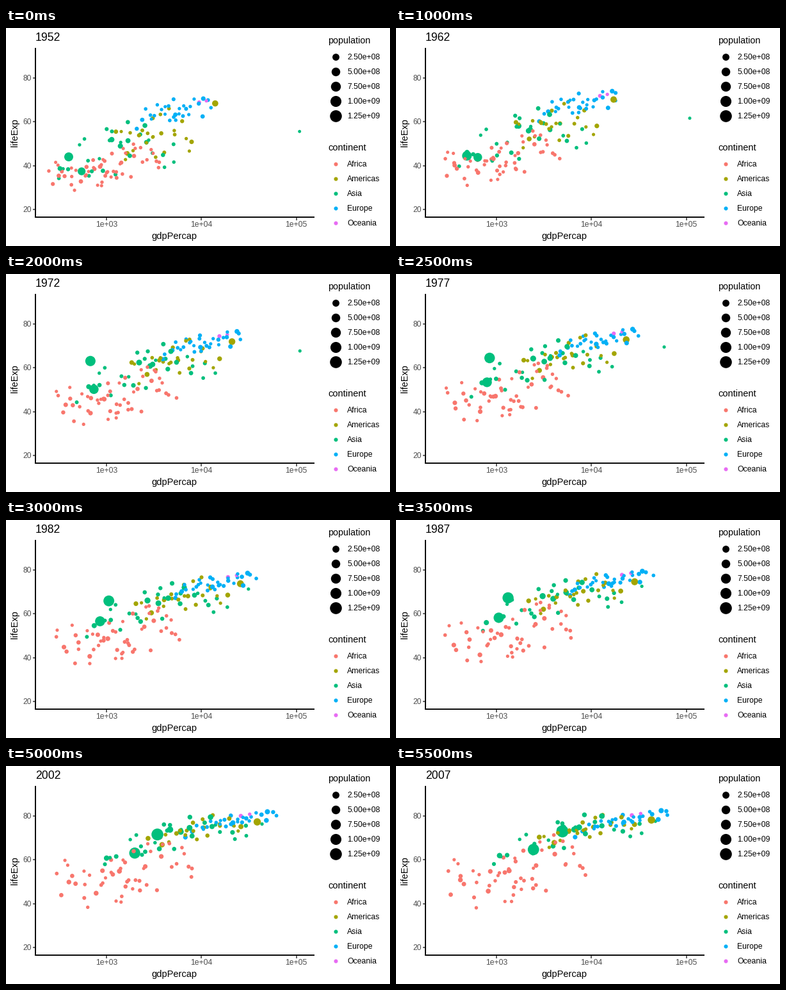
Write a matplotlib script that moves like this. It is 600 by 340 pixels and loops after 6000 ms.

```python
import numpy as np
import matplotlib.pyplot as plt
from matplotlib.animation import FuncAnimation

W, H, DPI = 600, 340, 100
PT = 72 / DPI
YEARS = np.arange(1952, 2008, 5)
T = np.linspace(0, 1, len(YEARS))
EASE = 1 - (1 - T) ** 1.5
MAX_POP = 1319
COLORS = {"Africa": "#F8766D", "Americas": "#A3A500", "Asia": "#00BF7D",
          "Europe": "#00B0F6", "Oceania": "#E76BF3"}

rng = np.random.default_rng(21)


def sx(log_income):
    return 157 + 148.25 * (log_income - 3)


def sy(life):
    return 283 - 3.417 * (life - 20)


def diameter(pop):
    return 4.75 + 14.2 * np.sqrt(np.asarray(pop) / MAX_POP)


def area(d):
    return (np.asarray(d) * PT) ** 2


def spread(n):
    """Evenly filled hump between -1.9 and 1.9, in random order."""
    u = 2 * (rng.permutation(n) + 0.5) / n - 1
    return 1.9 * np.sign(u) * np.abs(u) ** 1.3


def eased(pair):
    return pair[0] + (pair[1] - pair[0]) * EASE


def leader(pop, *path):
    """A country that stands out, led through (year, income, life) points."""
    year, income, life = np.array(path).T
    return [np.stack([np.interp(YEARS, year, np.log10(income)),
                      np.interp(YEARS, year, life),
                      pop[0] + (pop[1] - pop[0]) * T])]


def crowd(n, pop, income, width, life, slope, scatter):
    """Countries scattered around a trend that rises and flattens over time."""
    tracks = []
    for z, noise, size in zip(spread(n), spread(n), spread(n)):
        sway = 0.1 * np.sin(7 * T + rng.uniform(0, 2 * np.pi))
        dx = width * (1 + 0.25 * T) * (z + sway)
        y = eased(life) + slope * dx - 5 * dx ** 2 + eased(scatter) * (noise + sway)
        tracks.append(np.stack([eased(income) + dx, y,
                                pop * (1 + T) * np.exp(1.1 * size)]))
    return tracks


groups = [
    ("Asia", leader((556, 1319), (1952, 400, 44), (1962, 488, 44.5),
                    (1972, 677, 63.1), (1992, 1656, 68.7), (2007, 4959, 73))),
    ("Asia", leader((372, 1110), (1952, 547, 37.4), (1982, 856, 56.6),
                    (2007, 2452, 64.7))),
    ("Americas", leader((157, 301), (1952, 13990, 68.4), (2007, 42952, 78.2))),
    ("Asia", leader((0.2, 2.5), (1952, 108382, 55.6), (1972, 109348, 67.7),
                    (1982, 31354, 71.3), (2007, 47307, 77.6))),
    ("Africa", crowd(52, 4, (2.98, 3.2), 0.31, (39.5, 55), 9, (4.3, 7))),
    ("Americas", crowd(24, 6, (3.5, 3.94), 0.23, (53.5, 74), 12, (6, 2.6))),
    ("Asia", crowd(30, 12, (3.1, 3.74), 0.35, (47, 72), 11, (6.5, 3.6))),
    ("Europe", crowd(30, 5, (3.71, 4.33), 0.21, (65, 78), 9, (2.8, 1.3))),
    ("Oceania", crowd(2, 5, (4.01, 4.47), 0.05, (69.2, 80.7), 5, (0.2, 0.2))),
]
tracks = np.array([track for _, group in groups for track in group])
hues = np.array([COLORS[name] for name, group in groups for _ in group])
order = rng.permutation(len(tracks))
tracks, hues = tracks[order], hues[order]

plt.rcParams["font.family"] = "Liberation Sans"
fig = plt.figure(figsize=(W / DPI, H / DPI), dpi=DPI, facecolor="white")
ax = fig.add_axes([0, 0, 1, 1])
ax.set(xlim=(0, W), ylim=(H, 0))
ax.axis("off")


def label(x, y, text, px, color="black", **kw):
    return ax.text(x, y, text, fontsize=px * PT, color=color, **kw)


def line(xs, ys, px, color="black"):
    ax.plot(xs, ys, color=color, lw=px * PT, solid_capstyle="butt", zorder=1)


line((46, 46), (31, 296), 1.9)
line((45, 482), (295, 295), 1.9)
for life in (20, 40, 60, 80):
    line((41.5, 45), (sy(life),) * 2, 1.5, "#333333")
    label(40, sy(life) + 4, str(life), 12, "#4D4D4D", ha="right")
for power in (3, 4, 5):
    line((sx(power),) * 2, (296, 299.5), 1.5, "#333333")
    label(sx(power), 310, f"1e+0{power}", 12.2, "#4D4D4D", ha="center")
label(263, 329, "gdpPercap", 14.67, ha="center")
label(13.7, 163, "lifeExp", 14.5, rotation=90, ha="center", va="center")

label(503, 24, "population", 14.3)
for i in range(5):
    pop = 250 * (i + 1)
    y = 45 + 23 * i
    ax.scatter(515, y, s=area(diameter(pop)), c="black", linewidths=0)
    label(533, y + 4, f"{pop * 1e6:.2e}", 12.2)
label(503, 191, "continent", 14.67)
for i, (name, color) in enumerate(COLORS.items()):
    y = 212 + 23 * i
    ax.scatter(515, y, s=area(6.1), c=color, linewidths=0)
    label(533, y + 4.2, name, 12.2)

title = label(46, 19.6, "", 17.6)
dots = ax.scatter(np.zeros(len(tracks)), np.zeros(len(tracks)), c=hues,
                  linewidths=0, zorder=2)


def update(i):
    log_income, life, pop = tracks[:, :, i].T
    dots.set_offsets(np.column_stack([sx(log_income), sy(life)]))
    dots.set_sizes(area(diameter(pop)))
    title.set_text(str(YEARS[i]))
    return dots, title


anim = FuncAnimation(fig, update, frames=len(YEARS), interval=500,
                     repeat=True, repeat_delay=0)
plt.show()
```
